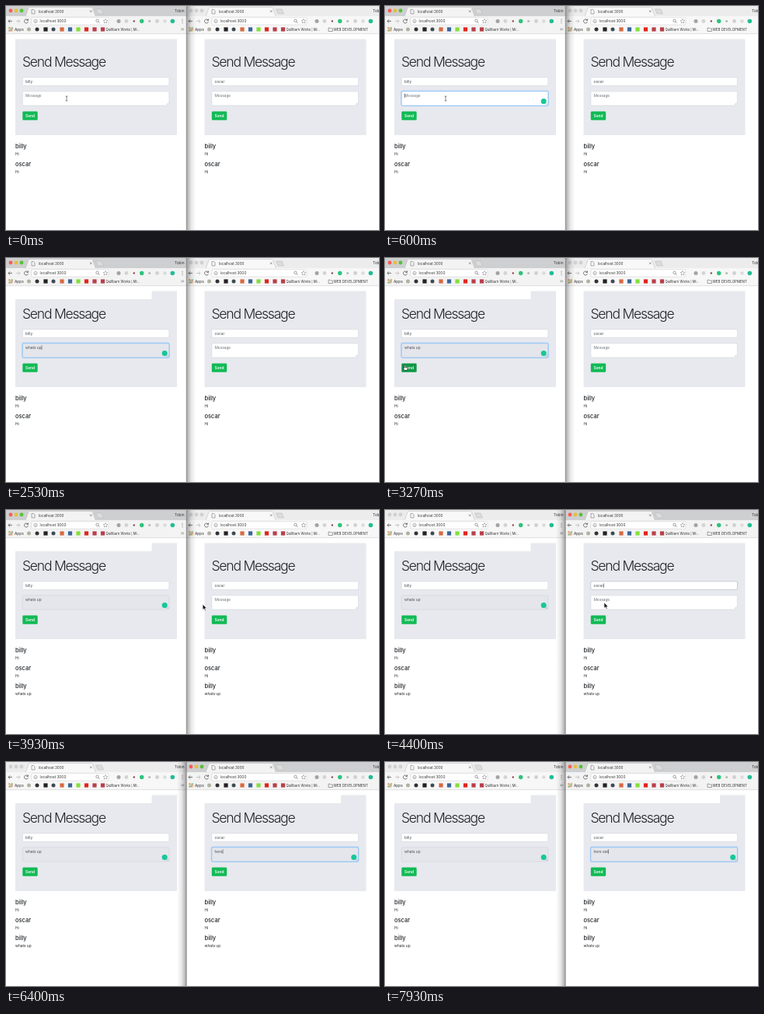
An HTML page that plays this animation: 480 by 288 pixels, repeating every 8 s.

```html
<!DOCTYPE html>
<html lang="en">
<head>
<meta charset="utf-8">
<title>Two chat windows</title>
<style>
  html, body { margin: 0; width: 100%; height: 100%; overflow: hidden; background: #fff; }
  svg { display: block; width: 100vw; height: 100vh; font-family: Inter, Roboto, sans-serif; }
  text { white-space: pre; }
</style>
</head>
<body>
<svg id="stage" viewBox="0 0 480 288"></svg>
<script>
const LOOP = 8000;
const stage = document.getElementById('stage');

const rect = (x, y, w, h, fill, extra = '') =>
  `<rect x="${x}" y="${y}" width="${w}" height="${h}" fill="${fill}" ${extra}/>`;
const dot = (x, y, r, fill, extra = '') =>
  `<circle cx="${x}" cy="${y}" r="${r}" fill="${fill}" ${extra}/>`;
const line = (d, color = '#666', width = 0.8) =>
  `<path d="${d}" fill="none" stroke="${color}" stroke-width="${width}"/>`;
const label = (x, y, size, str, fill = '#333', extra = '') =>
  `<text x="${x}" y="${y}" font-size="${size}" fill="${fill}" ${extra}>${str}</text>`;

// Browser frame, drawn from x = 0 with width w
function chrome(w, name) {
  let s = rect(0, 0, w, 13.5, '#cecfd0', `id="${name}-strip"`);
  for (let i = 0; i < 3; i++) s += dot(6 + 7 * i, 6, 2.4, '#ccc', `id="${name}-light${i}"`);
  s += `<path id="${name}-tab" d="M25 13.5 L29 2.6 Q29.5 1.6 31 1.6 H109.5 Q111 1.6 111.5 2.6 L115.5 13.5Z" fill="#f3f3f3" stroke="#b4b4b4" stroke-width=".5"/>`;
  s += `<path d="M115.500 4 H123 L125.500 10 H118Z" fill="#dcdcdc" stroke="#b4b4b4" stroke-width=".5"/>`;
  s += line('M33 4.500 h2.500 l1.500 1.500 v4 h-4z', '#777', 0.6);
  s += label(42, 8.8, 4.6, 'localhost:3000');
  s += line('M108 5.500 l2.600 2.600 m0 -2.600 l-2.600 2.600', '#666', 0.6);
  s += label(w - 15, 7.6, 4.8, 'Tobin');

  s += rect(0, 13.2, w, 22.5, '#f3f3f3', `id="${name}-bar"`);
  s += line('M8 19.500 h-5 m2.200 -2.200 l-2.200 2.200 l2.200 2.200', '#555');
  s += line('M13 19.500 h5 m-2.200 -2.200 l2.200 2.200 l-2.200 2.200', '#bbb');
  s += line('M28.200 18.300 a2.500 2.500 0 1 0 .2 2 M28.500 16.500 v2 h-2', '#555');
  s += rect(33, 14.8, w - 133, 9.4, '#fff', 'rx="1.2" stroke="#c8c8c8" stroke-width=".5"');
  s += dot(38, 19.5, 2.1, 'none', 'stroke="#777" stroke-width=".6"') + rect(37.7, 19, 0.6, 1.7, '#777');
  s += label(43.5, 21.2, 4.8, 'localhost:3000');
  const r = w - 232;
  s += dot(117.5 + r, 18.8, 1.7, 'none', 'stroke="#666" stroke-width=".6"') + line(`M${118.8 + r} 20.2 l1.700 1.700`);
  s += line(`M${128 + r} 16.500 l.9 1.900 2 .2 -1.500 1.400 .5 2 -1.900 -1 -1.900 1 .5 -2 -1.500 -1.400 2 -.2z`, '#777', 0.5);
  const tools = [['#a3a3a3', 2.5], ['#d3d3d3', 2.4], ['#8b4a4a', 1.2], ['#2cc47b', 2.7], ['#b3bcb8', 1.6], ['#d0d0d0', 2.4], ['#dadada', 2.2], ['#22bd93', 2.8]];
  tools.forEach(([c, size], i) => { s += dot(145 + 9.9 * i + r, 19.5, size, c); });
  for (let i = 0; i < 3; i++) s += dot(227 + r, 17.3 + 2.2 * i, 0.55, '#666');

  const grid = ['#d75b4b', '#e7b43f', '#4aa366'];
  for (let i = 0; i < 9; i++) s += rect(3.5 + (i % 3) * 1.9, 27.3 + Math.floor(i / 3) * 1.9, 1.4, 1.4, grid[(i + Math.floor(i / 3)) % 3]);
  s += label(11, 31.7, 4.8, 'Apps');
  const round = [[29.5, '#b5b0a4'], [40, '#333'], [61, '#3d4c55']];
  const square = [[51, '#222'], [72, '#d9693f'], [82.5, '#3b659a'], [93, '#84e03c'], [103.5, '#e3251d'], [114, '#b8404b'], [124.5, '#b8404b']];
  round.forEach(([x, c]) => { s += dot(x, 30, 2.5, c); });
  square.forEach(([x, c]) => { s += rect(x - 2.6, 27.4, 5.2, 5.2, c); });
  s += label(128.5, 31.7, 4.2, 'Quillbarn Works | Mi...');
  if (r > 0) {
    s += line('M183 28.200 h2 l.7 .8 h2.700 v3.500 h-5.400z', '#666', 0.6);
    s += label(189.5, 31.7, 4.45, 'WEB DEVELOPMENT');
  } else {
    s += line('M225.500 28.500 l1.300 1.400 -1.300 1.400 m2 -2.800 l1.300 1.400 -1.300 1.400', '#555', 0.6);
  }
  return s + rect(0, 35.5, w, 0.6, '#cfcfcf');
}

function post(y, who, what, extra = '') {
  return `<g ${extra}>${label(0, y, 7.5, who, '#212529', 'font-weight="500"')}${label(0, y + 8.6, 4.8, what, '#212529')}</g>`;
}

function form(name, user) {
  const border = 'rx="1.3" stroke="#ced4da" stroke-width=".6"';
  return rect(0, 42.5, 208, 123.5, '#e7e9ee') +
    rect(-0.5, 42, 176, 11, '#fff', `id="${name}-gap"`) +
    label(9, 77.8, 17.6, 'Send Message', '#212529', 'font-weight="300" letter-spacing="-1.25"') +
    rect(9.3, 91.8, 188.6, 10.6, '#fff', `${border} id="${name}-user"`) +
    label(13, 98.8, 4.8, user, '#495057', `id="${name}-name"`) +
    rect(13, 94.3, 0.5, 5.6, '#222', `id="${name}-nameCaret"`) +
    rect(9.1, 109.5, 188.9, 18.6, 'none', `rx="1.5" stroke="#80bdff" stroke-width="1.8" id="${name}-glow"`) +
    rect(9.3, 109.8, 188.6, 18.2, '#fff', `${border} id="${name}-area"`) +
    line('M194.500 127 l2.500 -2.500 m-1 2.500 l1 -1', '#888', 0.4) +
    label(13, 116.9, 4.8, 'Message', '#6c757d', `id="${name}-text"`) +
    rect(13, 112.4, 0.5, 5.6, '#222', `id="${name}-caret"`) +
    dot(192.2, 122.4, 3.5, '#16c79a', `id="${name}-badge"`) +
    rect(9.3, 135.5, 19.4, 11.3, '#12ba55', `rx="1.4" id="${name}-send"`) +
    label(19, 143, 4.8, 'Send', '#fff', 'text-anchor="middle" font-weight="600"') +
    post(183, 'billy', 'Hi') + post(206, 'oscar', 'Hi') +
    post(229, 'billy', 'whats up', `id="${name}-post"`);
}

const pane = (x, w, name, user) =>
  `<g transform="translate(${x})">${rect(0, 0, w, 288, '#fff')}${chrome(w, name)}` +
  `<g transform="translate(${(w - 208) / 2})">${form(name, user)}</g></g>`;

const fade = (id, from, to) =>
  `<linearGradient id="${id}"><stop stop-color="#000" stop-opacity="${from}"/><stop offset=".5" stop-color="#000" stop-opacity=".09"/><stop offset="1" stop-color="#000" stop-opacity="${to}"/></linearGradient>`;

stage.innerHTML =
  `<defs>${fade('fadeR', 0.34, 0)}${fade('fadeL', 0, 0.34)}</defs>` +
  pane(0, 232, 'L', 'billy') + pane(232, 255, 'R', 'oscar') +
  rect(231.8, 0, 0.8, 288, '#858587') +
  rect(232.5, 0, 12, 288, 'url(#fadeR)', 'id="shadeR"') + rect(220, 0, 12, 288, 'url(#fadeL)', 'id="shadeL"') +
  `<g id="mouse">` +
  `<g id="ibeam">${line('M-1.300 -3.200 q1.300 0 1.300 1 q0 -1 1.300 -1 M0 -2.300 v4.600 M-1.300 3.200 q1.300 0 1.300 -1 q0 1 1.300 1', '#333', 0.6)}</g>` +
  `<path id="arrow" d="M0 -3 v7.200 l1.700 -1.500 1.200 2.600 1.200 -.5 -1.200 -2.500 h2.300z" fill="#111" stroke="#fff" stroke-width=".6"/>` +
  `<path id="hand" d="M-1 3.500 L-2.800 .6 q-.2 -1 1 -.4 l.6 .6 V-3 q.7 -1 1.300 0 V-.6 l2.700 .6 q.5 .3 .3 1.200 L2.500 3.500z" fill="#fff" stroke="#222" stroke-width=".7"/>` +
  `</g>`;

const el = {};
stage.querySelectorAll('[id]').forEach(n => { el[n.id] = n; });

const set = (id, key, value) => el[id].setAttribute(key, value);
const show = (id, on) => set(id, 'opacity', on ? 1 : 0);
const ramp = (t, a, b) => Math.min(1, Math.max(0, (t - a) / (b - a)));
const within = (t, a, b) => t >= a && t < b;
const typed = (str, times, t) => str.slice(0, times.filter(k => t >= k).length);

const path = [[0, 78, 119], [2730, 78, 119], [3130, 26, 141], [3670, 26, 141], [4000, 282, 122], [LOOP, 282, 122]];
function mouseAt(t) {
  const i = path.findIndex(p => t < p[0]);
  const [t0, x0, y0] = path[i - 1], [t1, x1, y1] = path[i];
  const u = ramp(t, t0, t1), e = u * u * (3 - 2 * u);
  return [x0 + (x1 - x0) * e, y0 + (y1 - y0) * e];
}

const strokes = {
  L: ['whats up', [1130, 1200, 1400, 1470, 1870, 2130, 2330, 2530]],
  R: ['here eat', [5330, 5670, 5670, 5870, 7000, 7670, 7870, 7930]]
};

function drawWindow(name, active) {
  const lights = active ? ['#fc5b57', '#e5bf3c', '#57c038'] : ['#d0d0d0', '#d0d0d0', '#d0d0d0'];
  lights.forEach((c, i) => set(`${name}-light${i}`, 'fill', c));
  set(`${name}-strip`, 'fill', active ? '#cecfd0' : '#ececec');
  set(`${name}-tab`, 'fill', active ? '#f3f3f3' : '#f8f8f8');
  set(`${name}-bar`, 'fill', active ? '#f3f3f3' : '#f7f7f7');
}

function drawForm(name, t, s) {
  const text = typed(...strokes[name], t);
  el[`${name}-text`].textContent = text || 'Message';
  set(`${name}-text`, 'fill', text ? '#495057' : '#6c757d');
  const width = text ? el[`${name}-text`].getComputedTextLength() : 0;
  set(`${name}-caret`, 'x', 13.1 + width);
  show(`${name}-caret`, s.caret);
  set(`${name}-nameCaret`, 'x', 13.1 + el[`${name}-name`].getComputedTextLength());
  show(`${name}-nameCaret`, s.nameCaret);
  set(`${name}-user`, 'stroke', s.nameFocus ? '#a9b4c0' : '#ced4da');
  set(`${name}-glow`, 'opacity', 0.5 * s.focus);
  set(`${name}-area`, 'stroke', s.focus > 0.5 ? '#7ab8f5' : '#ced4da');
  set(`${name}-area`, 'fill', s.grey ? '#e4e6eb' : '#fff');
  show(`${name}-gap`, s.gap);
  show(`${name}-badge`, s.badge);
  set(`${name}-send`, 'fill', s.hover ? '#0d9845' : '#12ba55');
  show(`${name}-post`, t >= 3530);
}

function render(t) {
  const left = t < 4200;
  drawWindow('L', left);
  drawWindow('R', !left);
  show('shadeR', left);
  show('shadeL', !left);

  drawForm('L', t, {
    focus: ramp(t, 400, 600) * (1 - ramp(t, 3330, 3480)),
    caret: within(t, 130, 2670), gap: t >= 870, grey: t >= 930, badge: t >= 530,
    hover: within(t, 3100, 3730)
  });
  drawForm('R', t, {
    focus: ramp(t, 5000, 5150),
    caret: t >= 5070, gap: t >= 5470, grey: t >= 5470, badge: t >= 5200,
    nameFocus: within(t, 4270, 5000), nameCaret: within(t, 4270, 4730)
  });

  const [x, y] = mouseAt(t);
  set('mouse', 'transform', `translate(${x} ${y})`);
  show('mouse', t < 1130 || within(t, 2730, 5330));
  const hand = within(t, 3100, 3730);
  const arrow = !hand && within(t, 3000, 4730);
  show('hand', hand);
  show('arrow', arrow);
  show('ibeam', !hand && !arrow);
}

const start = performance.now();
function tick() {
  render((performance.now() - start) % LOOP);
  requestAnimationFrame(tick);
}
tick();
</script>
</body>
</html>
```
